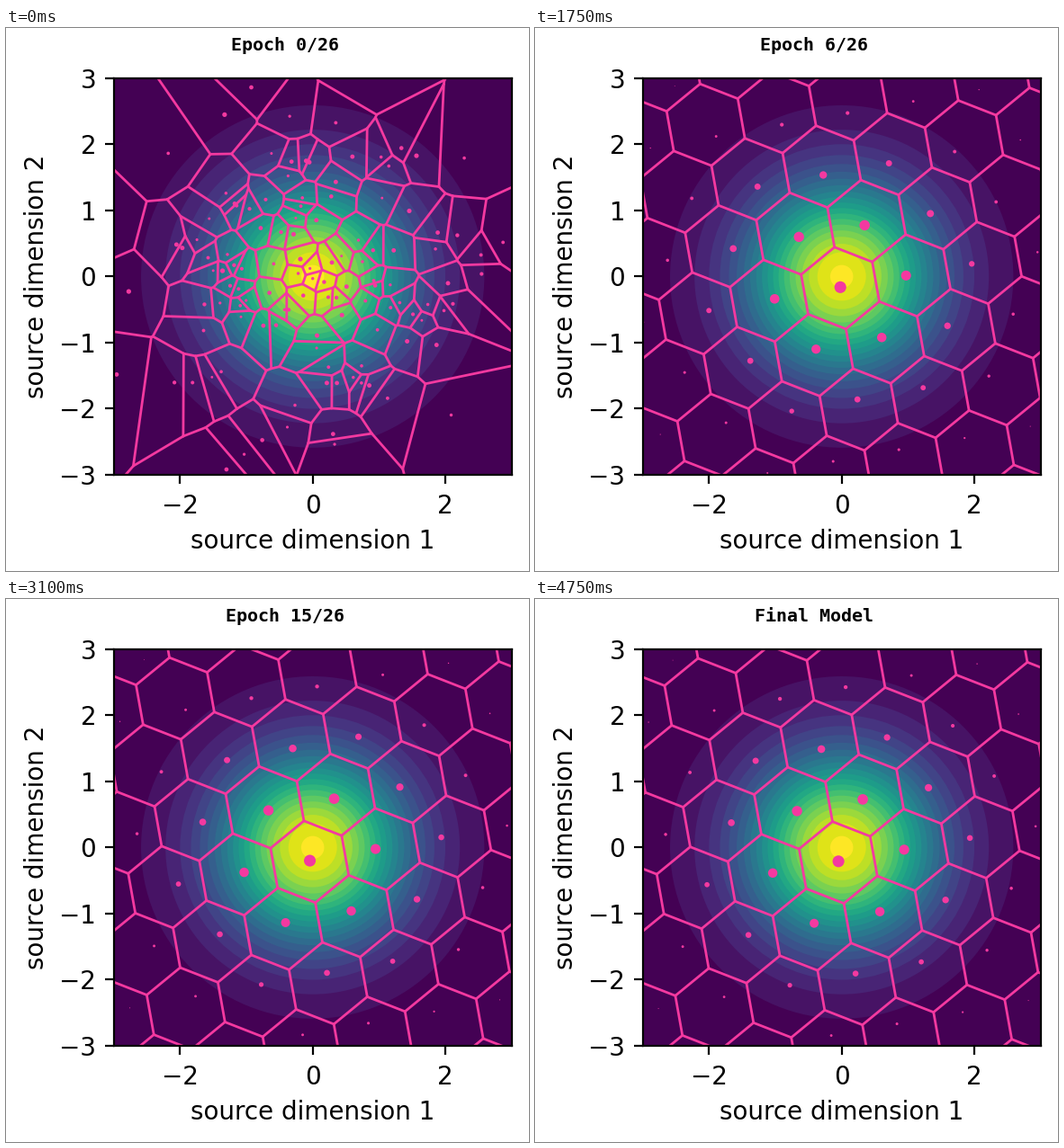
Animation, 581 px wide and 604 px high, one loop 6750 ms. Source, as a matplotlib script:

```python
import numpy as np
import matplotlib.pyplot as plt
from matplotlib.animation import FuncAnimation
from matplotlib.collections import LineCollection
from matplotlib.patches import Circle
from matplotlib.tri import Triangulation

W, H, DPI = 581, 604, 200
LEFT, TOP, WIDTH, HEIGHT = 119.8, 55.8, 441.8, 441.2    # axes box in px
ORIGIN, UNIT = np.array([LEFT + WIDTH / 2, TOP + HEIGHT / 2]), WIDTH / 6
PINK = "#F439A0"
EPOCHS = 26
HOLD, STEP = 20, 3      # ticks of 50 ms: first picture, each epoch
RATE = 1.0825           # rate penalty pushes the cell borders outwards


def to_data(p):
    return (np.asarray(p, float) - ORIGIN) / UNIT * [1, -1]


def polar(radius, angle):
    return np.column_stack([radius * np.cos(angle), radius * np.sin(angle)])


def ring(centre, count, radius, start, wave):
    """Evenly spaced points, pulled into a six-fold wave."""
    turn = 2 * np.pi * np.arange(count) / count
    r = radius - wave * np.cos(6 * turn + np.pi / 5)
    return centre + polar(r, turn + np.radians(start))


def lattice():
    """Hexagonal lattice the codebook settles into, in px."""
    i, j = np.mgrid[-9:10, -9:10].reshape(2, -1, 1)
    p = np.array([337, 292]) + i * np.array([73, -13]) + j * np.array([46, 56])
    return p[(abs(p - ORIGIN) < 450).all(axis=1)]


rng = np.random.default_rng(8)
START = rng.normal(0, 1.2, (120, 2))
START_RADII = rng.uniform(1.4, 2.7, len(START))
RINGS = np.vstack([
    [[342, 283]],
    ring((342, 283), 6, 71, -68, 0),
    ring((348, 283), 15, 134, -94, 14),
    ring((341, 277), 20, 193, -92, 14),
    ring((341, 277), 22, 245, -88, 8),
    ring((341, 277), 28, 310, -88, 0),
    ring((341, 277), 34, 380, -88, 0),
])
LATTICE = lattice()
gaps = np.linalg.norm(RINGS[:, None] - LATTICE, axis=2)
NEAREST = LATTICE[gaps.argmin(axis=1)]
FAR = polar(60, 2 * np.pi * np.arange(24) / 24)


def codebook(epoch):
    if epoch == 0:
        return START
    drift = np.array([3, -5]) * np.exp((4 - epoch) / 6.5)
    if epoch < 4:
        pull = 1 - ((4 - epoch) / 3) ** 2
        return to_data(RINGS + (NEAREST + drift - RINGS) * pull)
    return to_data(LATTICE + drift)


def voronoi(p):
    """Cell borders: joined circumcentres of the Delaunay triangles."""
    p = np.vstack([p, FAR])
    tri = Triangulation(*p.T)
    a, b, c = p[tri.triangles.T]
    b, c = b - a, c - a
    bb, cc = (b ** 2).sum(1), (c ** 2).sum(1)
    d = 2 * (b[:, 0] * c[:, 1] - b[:, 1] * c[:, 0])
    centre = a + np.column_stack([c[:, 1] * bb - b[:, 1] * cc,
                                  b[:, 0] * cc - c[:, 0] * bb]) / d[:, None]
    return [(centre[i], centre[j])
            for i, row in enumerate(tri.neighbors) for j in row if j > i]


def dot_radii(p):
    return 6.6 * np.exp(-(p ** 2).sum(1) / 5.3)


fig = plt.figure(figsize=(W / DPI, H / DPI), dpi=DPI, facecolor="white")
ax = fig.add_axes([LEFT / W, 1 - (TOP + HEIGHT) / H, WIDTH / W, HEIGHT / H])
viridis = plt.get_cmap("viridis")
ax.set_facecolor(viridis(0))
for n in range(20):
    level = 0.035 + 0.05 * n
    ax.add_patch(Circle((0, 0), np.sqrt(-2 * np.log(level)), lw=0,
                        color=viridis((n + 1) / 20)))
ax.set(xlim=(-3, 3), ylim=(-3, 3), xticks=[-2, 0, 2], yticks=range(-3, 4),
       xlabel="source dimension 1", ylabel="source dimension 2")
ax.tick_params(axis="x", pad=3.9)

borders = LineCollection([], colors=PINK, linewidths=1, capstyle="round")
ax.add_collection(borders, autolim=False)
dots = ax.scatter([], [], color=PINK, linewidths=0)
title = fig.text(310 / W, 1 - 25 / H, "", ha="center", va="baseline",
                 family="DejaVu Sans Mono", weight="bold", size=7.2)


def draw(tick):
    epoch = 0 if tick < HOLD else min(EPOCHS, 1 + (tick - HOLD) // STEP)
    p = codebook(epoch)
    radii = dot_radii(p) if epoch else START_RADII
    borders.set_segments(voronoi(p * RATE if epoch else p))
    dots.set_offsets(p)
    dots.set_sizes((2 * radii * 72 / DPI) ** 2)
    title.set_text("Final Model" if epoch == EPOCHS
                   else f"Epoch {epoch}/{EPOCHS}")
    return borders, dots, title


anim = FuncAnimation(fig, draw, frames=135, interval=50, repeat=True,
                     repeat_delay=0, init_func=lambda: draw(0))
plt.show()
```
